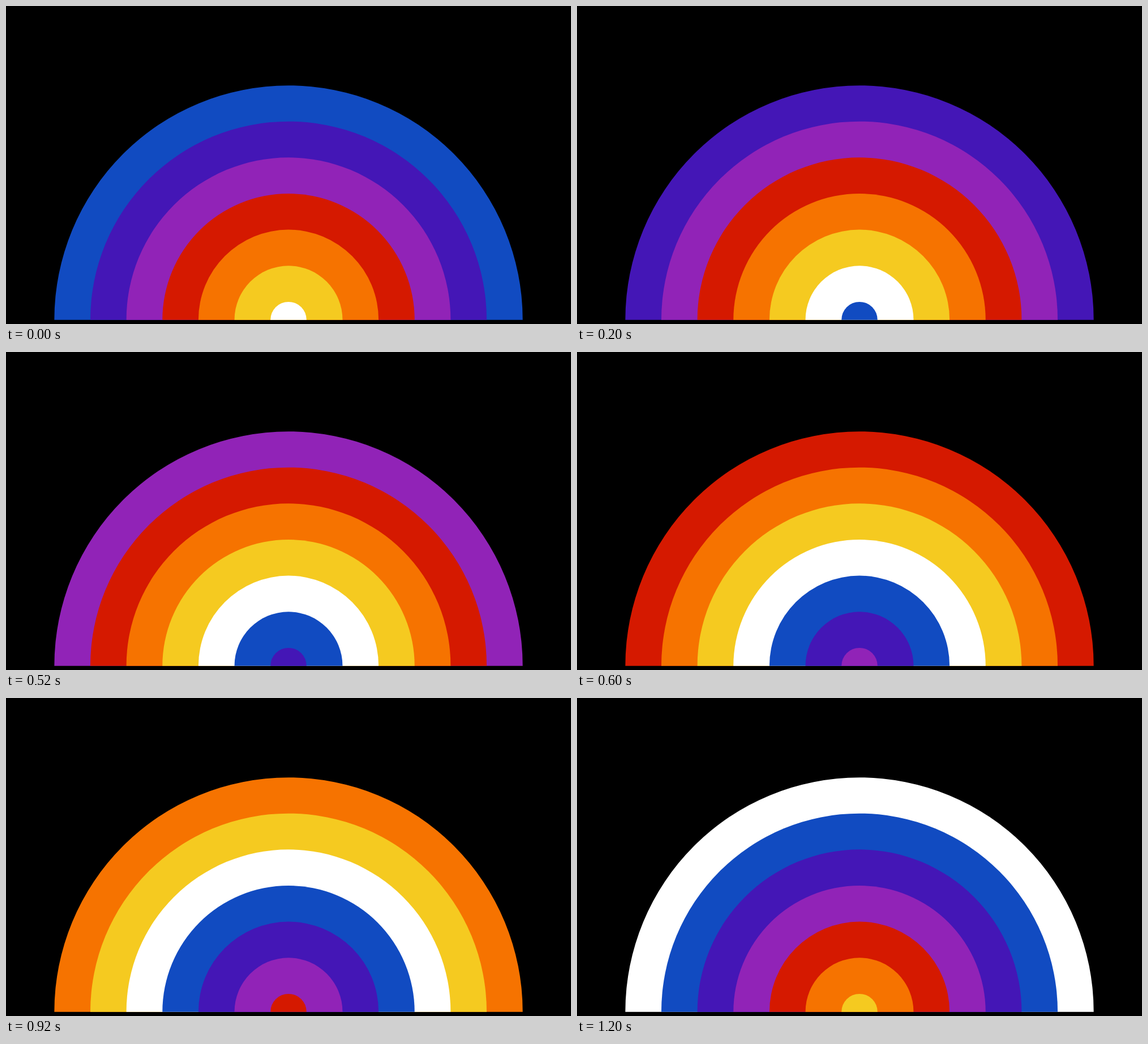
An HTML page that plays this animation: 998 by 561 pixels, repeating every 1400 ms.

```html
<!DOCTYPE html>
<html lang="en">
<head>
<meta charset="utf-8">
<title>Rainbow rings</title>
<style>
html, body { margin: 0; width: 100%; height: 100%; overflow: hidden; background: #000; }
svg { display: block; width: 100%; height: 100%; }
</style>
</head>
<body>
<svg id="stage" viewBox="0 0 998 561"></svg>
<script>
const COLORS = ['#114bc1', '#4416b6', '#9123b7', '#d51900', '#f67300', '#f5ca20', '#ffffff'];
const STEP = 200;
const CX = 499, BASE = 553.7, UNIT = 31.82;
const count = COLORS.length;
const stage = document.getElementById('stage');

// Half discs, largest first, so each one covers the middle of the last.
const arcs = COLORS.map((_, i) => {
  const r = UNIT * (2 * (count - i) - 1);
  const arc = document.createElementNS('http://www.w3.org/2000/svg', 'path');
  arc.setAttribute('d', `M${CX - r} ${BASE}A${r} ${r} 0 0 1 ${CX + r} ${BASE}Z`);
  stage.append(arc);
  return arc;
});

// Colours move outward by one ring per step.
function paint(time) {
  const shift = Math.floor(time / STEP) % count;
  arcs.forEach((arc, i) => arc.setAttribute('fill', COLORS[(i + shift) % count]));
}

let start;
function tick(now) {
  start ??= now;
  paint(now - start);
  requestAnimationFrame(tick);
}
paint(0);
requestAnimationFrame(tick);
</script>
</body>
</html>
```
